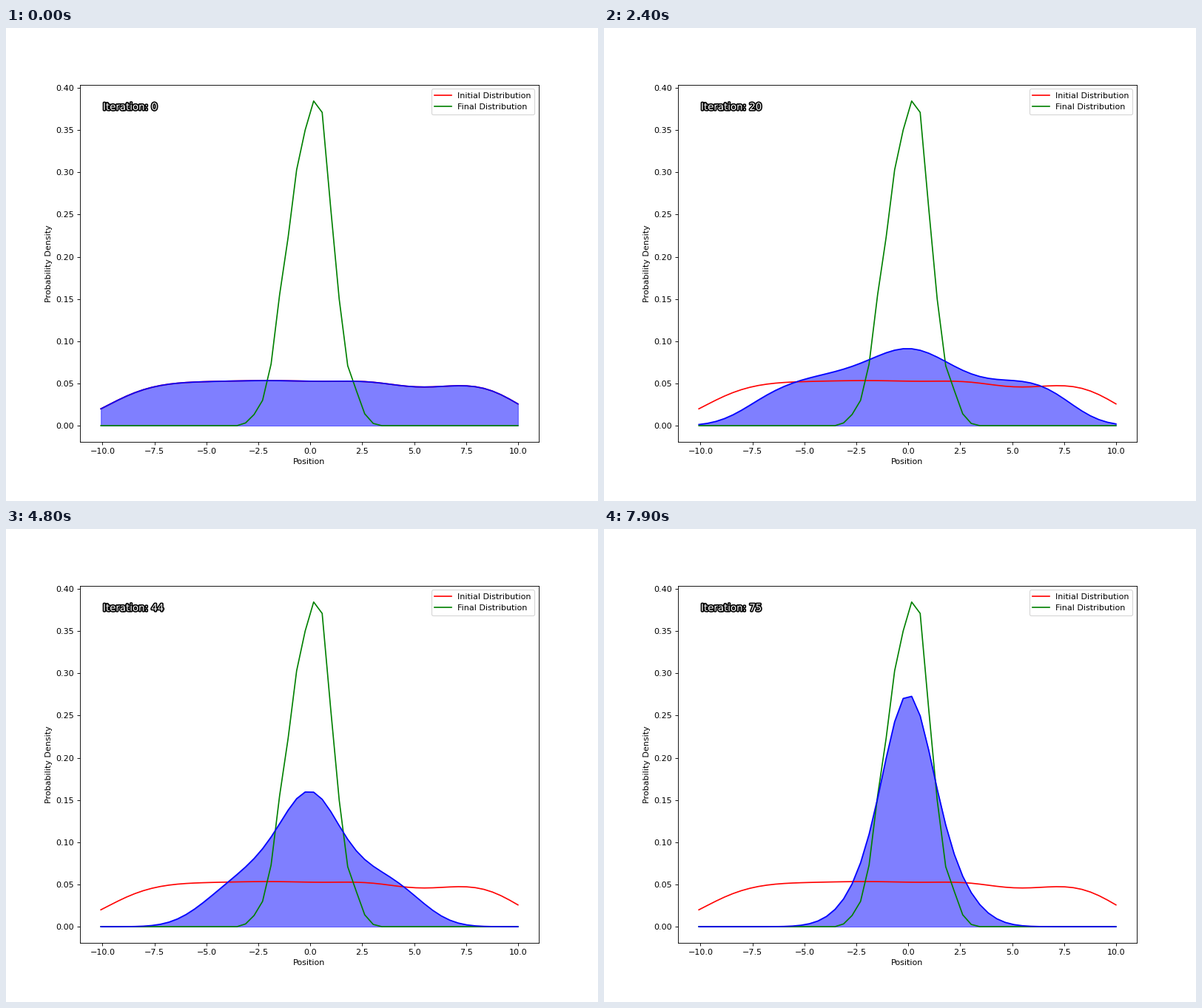
Recreate the animation shown at these times as a matplotlib script. Size 800 px wide and 640 px high, loop 8 s.

```python
import numpy as np
import matplotlib.pyplot as plt
from matplotlib import patheffects
from matplotlib.animation import FuncAnimation

STEP_MS = 100
FRAMES = 80
HOLD = 4          # extra frames spent on iteration 0
PROPOSAL = 0.5    # walkers propose uniform moves up to this size
BANDWIDTH = 0.25  # kernel width relative to the spread

X = np.linspace(-10.08, 9.99, 50)

# 1000 walkers start in ten equal bins over [-10, 10]
COUNTS = [80, 104, 104, 107, 108, 101, 114, 79, 100, 103]
CELLS = np.linspace(-9.98, 9.98, 500)

# settled density in thousandths, at consecutive points of X
SETTLED_FROM = 17
SETTLED = [3.2, 13.2, 30, 73, 155, 223, 303, 350, 384.5,
           371, 258, 150, 71, 42, 14, 2.6]


def metropolis_matrix(z):
    """Transition matrix of a random walk settling to a unit normal."""
    here, there = z[:, None], z
    reach = np.abs(there - here) < PROPOSAL
    accept = np.exp(np.minimum(0, (here ** 2 - there ** 2) / 2))
    moves = reach * accept / reach.sum(axis=1).max()
    np.fill_diagonal(moves, 0)
    return moves + np.diag(1 - moves.sum(axis=1))


def smooth(mass):
    """Gaussian kernel estimate on X of the mass held by the cells."""
    mean = mass @ CELLS
    width = BANDWIDTH * np.sqrt(mass @ (CELLS - mean) ** 2)
    kernel = np.exp(-((X[:, None] - CELLS) / width) ** 2 / 2)
    return kernel @ mass / (width * np.sqrt(2 * np.pi))


def walk(iterations):
    mass = np.repeat(COUNTS, len(CELLS) // len(COUNTS)) / 1.0
    mass /= mass.sum()
    step = metropolis_matrix(CELLS)
    curves = [smooth(mass)]
    for _ in range(iterations):
        mass = mass @ step
        curves.append(smooth(mass))
    return curves


curves = walk(FRAMES - HOLD - 1)
final = np.zeros_like(X)
final[SETTLED_FROM:SETTLED_FROM + len(SETTLED)] = np.array(SETTLED) / 1000

fig, ax = plt.subplots(figsize=(10, 8), dpi=80)
fig.subplots_adjust(left=0.125, right=0.9, bottom=0.125, top=0.88)
ax.plot(X, curves[0], color="red", label="Initial Distribution")
ax.plot(X, final, color="green", label="Final Distribution")
line, = ax.plot(X, curves[0], color="blue")
fill = ax.fill_between(X, curves[0], color="blue", alpha=0.5)
ax.set_xlabel("Position")
ax.set_ylabel("Probability Density")
ax.legend(loc="upper right")
label = ax.text(0.05, 0.95, "", transform=ax.transAxes, fontsize=12,
                color="white", va="top")
label.set_path_effects([patheffects.withStroke(linewidth=3,
                                               foreground="black")])
ax.set_xlim(ax.get_xlim())
ax.set_ylim(ax.get_ylim())


def update(frame):
    iteration = max(0, frame - HOLD)
    y = curves[iteration]
    line.set_ydata(y)
    fill.set_verts([np.c_[np.r_[X[0], X, X[-1]], np.r_[0, y, 0]]])
    label.set_text(f"Iteration: {iteration}")
    return line, fill, label


anim = FuncAnimation(fig, update, frames=FRAMES, interval=STEP_MS,
                     repeat=True, repeat_delay=0)
plt.show()
```
